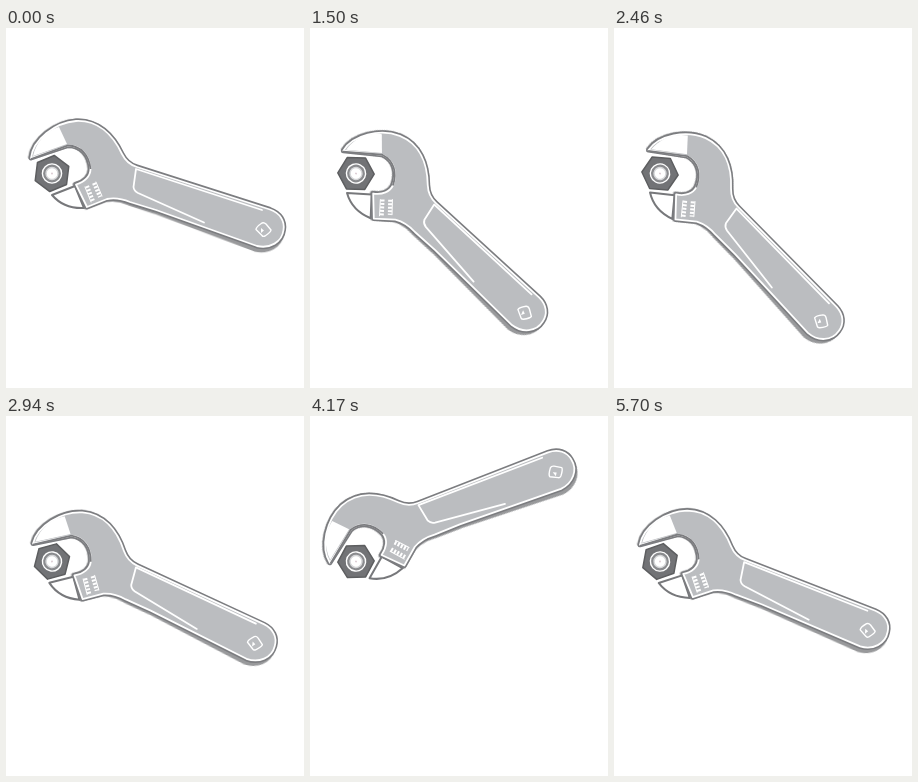
Recreate the animation shown at these times as an HTML page. Size 298 px wide and 360 px high, loop 6030 ms.

```html
<!DOCTYPE html>
<html lang="en">
<head>
<meta charset="utf-8">
<title>Wrench turning a nut</title>
<style>
  html, body { margin: 0; width: 100%; height: 100%; overflow: hidden; background: #fff; }
  svg { display: block; width: 298px; height: 360px; }
  .line { fill: none; stroke: #fff; stroke-linecap: round; stroke-linejoin: round; }
</style>
</head>
<body>
<svg viewBox="0 0 298 360">
  <defs>
    <path id="body" stroke-linejoin="round" d="M25 130 C27 112 49 94.500 70 93 C92 92 107 107 116 126
      Q121 136 131 139 L264 181.500 C274 185 279 193 277.500 202 C276 214 264 221 251 218
      L150 182 L124 174 Q112 169 101 171 L81 179 L70 156.500
      C79 154 84.500 148 84.500 141 C83.500 127 75 117.500 62 117.500 Z"/>
    <filter id="soft" x="-10%" y="-10%" width="120%" height="120%"><feGaussianBlur stdDeviation=".7"/></filter>
  </defs>
  <g id="wrench">
    <use href="#body" fill="none" stroke="#98999b" stroke-width="5" filter="url(#soft)"
      transform="rotate(1 100 135) translate(-.5 .5)"/>
    <path d="M46 167 L69 158 L78 180 Q58 181 46 167Z" fill="#fff" stroke="#77787b" stroke-width="2" stroke-linejoin="round"/>
    <use href="#body" fill="none" stroke="#7c7d80" stroke-width="5"/>
    <use href="#body" fill="#bbbdc0" stroke="#fff" stroke-width="1.800"/>
    <path d="M27 128 C30 114 40 103 53 99 L61 116Z" fill="#fff"/>
    <path d="M25 131 L62 117.500 C75 118 83 127 84.500 141" fill="none" stroke="#7c7d80" stroke-width="1.800"/>
    <path class="line" stroke-width="1.800" d="M256 182 L130 141 L127.500 159 Q128 163 132 165 L198 194.500"/>
    <g class="line" stroke-width="4" style="stroke-linecap: butt" stroke-dasharray="2 1.500">
      <path d="M81 158 L87 173"/>
      <path d="M88 155 L94 169"/>
    </g>
    <path class="line" stroke-width="1" d="M79 159 L85 174 M90 154 L96 168"/>
    <path class="line" stroke-width="1.400" d="M250 201.500 Q250 199 256 195 Q258 194 260 196 L265 202 Q265 204 259 208 Q257 209 256 207.500Z"/>
    <path d="M255 200 L258 202.500 L255 205Z" fill="#fff"/>
    <g id="nut" stroke-linejoin="round"></g>
  </g>
</svg>
<script>
const PIVOT = { x: 46, y: 145.5 };
const REST = 14.9;
const STEP = 30, LAST = 5700, LOOP = 6030;

// Turning points of the handle: time in ms, angle in degrees
const swings = [
  [0, 14.9], [600, 43], [1020, -15], [1500, 39.6], [1920, -21.7], [2640, 64],
  [3090, 1], [3510, 73], [4200, -28.5], [4500, 26], [4920, -35], [LAST, 18.4]
];

function hexagon(radius) {
  return Array.from({ length: 6 }, (_, i) => {
    const a = (37 + i * 60) * Math.PI / 180;
    return (PIVOT.x + radius * Math.cos(a)).toFixed(2) + ',' + (PIVOT.y + radius * Math.sin(a)).toFixed(2);
  }).join(' ');
}

const disc = (radius, fill, stroke = 'none') =>
  `<circle cx="${PIVOT.x}" cy="${PIVOT.y}" r="${radius}" fill="${fill}" stroke="${stroke}" stroke-width="1.4"/>`;

document.getElementById('nut').innerHTML =
  `<polygon points="${hexagon(18.2)}" fill="#727376" stroke="#5d5e60" stroke-width="1.5"/>` +
  disc(12, '#727376') + disc(9.6, '#8a8b8e', '#fff') + disc(6, '#fff', '#d5d6d8') + disc(.9, '#d8c6ce');

function angleAt(time) {
  const i = Math.max(1, swings.findIndex(([t]) => t >= time));
  const [t0, a0] = swings[i - 1], [t1, a1] = swings[i];
  return a0 + (a1 - a0) * (time - t0) / (t1 - t0);
}

const wrench = document.getElementById('wrench');

function draw() {
  const time = Math.min(LAST, Math.floor(performance.now() % LOOP / STEP) * STEP);
  wrench.setAttribute('transform', `rotate(${angleAt(time) - REST} ${PIVOT.x} ${PIVOT.y})`);
  requestAnimationFrame(draw);
}
draw();
</script>
</body>
</html>
```
